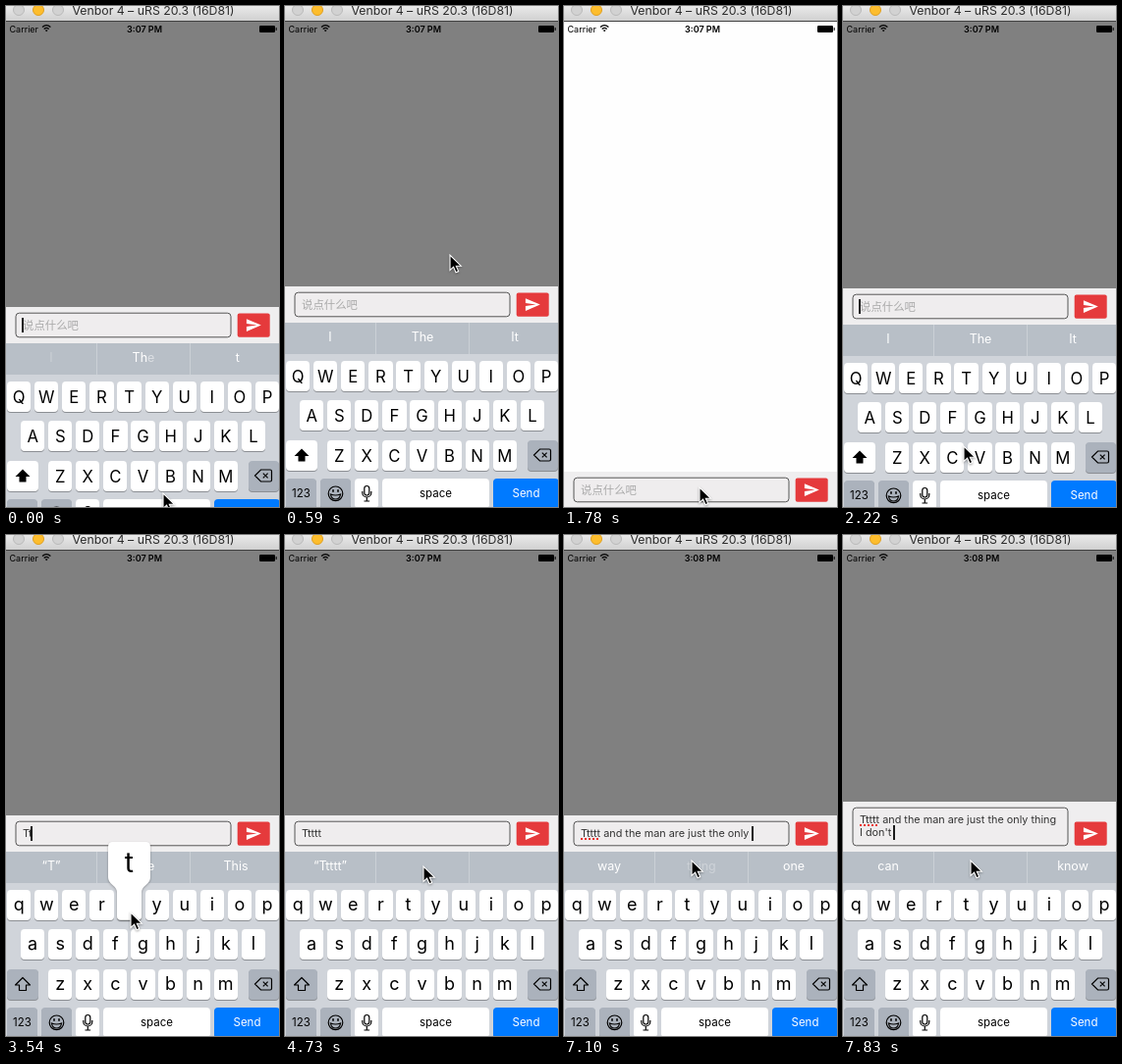
These frames come from a looping animation (278x511 px, 8 s). An HTML page:

```html
<!DOCTYPE html>
<html lang="en">
<head>
<meta charset="utf-8">
<title>Chat input</title>
<style>
html, body { margin: 0; width: 100%; height: 100%; overflow: hidden; }
#stage { position: relative; width: 278px; height: 511px; overflow: hidden; background: #808080;
  font-family: Inter, "Liberation Sans", sans-serif; color: #000; }
#stage.idle { background: #fefefe; }
#stage * { box-sizing: border-box; }
#stage div, #stage svg { position: absolute; }
#title { left: 0; top: 0; width: 278px; height: 16px; background: linear-gradient(#e9e9e9, #d0d0d0);
  border-bottom: 1px solid #404040; }
#title i { position: absolute; top: -2px; width: 12px; height: 12px; border-radius: 50%;
  background: #d2d2d2; border: 1px solid #bababa; }
#title .mid { background: #fdbd2d; border-color: #dfa023; }
#name { left: 61px; width: 178px; top: -4px; text-align: center; font-size: 12.3px; line-height: 17px;
  white-space: nowrap; color: #2c2c2c; }
.status { top: 18px; font-size: 9px; line-height: 12px; white-space: nowrap; }
#clock { left: 101px; width: 80px; text-align: center; font-weight: 600; }
#bar { left: 0; width: 278px; background: #efeeef; }
#bar svg { left: 0; top: 0; overflow: visible; }
#text { left: 17px; top: 11.5px; font-size: 10.85px; line-height: 13.5px; white-space: pre; color: #333; }
#hint { left: 17px; top: 10px; font: 11.4px/16px "Noto Sans CJK SC", "Noto Sans CJK", sans-serif;
  white-space: nowrap; color: #aaa; }
#text u { text-decoration: underline dotted #e8322c 2px; text-underline-offset: 2px; text-decoration-skip-ink: none; }
#caret { position: absolute; width: 2px; height: 15px; margin: -1px 0 0 -1px; background: #1c1c1c; }
#kb { left: 0; top: 323px; width: 278px; height: 190px; background: #d0d4da; }
#words { left: 0; top: 0; width: 278px; height: 32px; background: #b8bfc7; }
#words div { top: 0; height: 32px; text-align: center; color: #fff; font-size: 12.5px; line-height: 29px; }
#words div + div { border-left: 1px solid #cbd0d6; }
.key { height: 31px; border-radius: 4px; background: #fff; box-shadow: 0 1px 0 #8b8e93; text-align: center;
  font-size: 18px; line-height: 29px; }
.caps .letter { font-size: 16.7px; line-height: 33px; text-transform: uppercase; }
.key.dark { background: #abb2bc; }
.key.small { font-size: 11.5px; line-height: 31px; }
.key.blue { background: #007aff; color: #fff; }
.caps #shift { background: #fff; }
.caps #arrow { fill: #000; stroke: none; }
#kb svg { left: 0; top: 0; overflow: visible; }
#pop { filter: drop-shadow(0 1px 1px rgba(0,0,0,.3)); }
#cursor { left: -1px; top: -1px; overflow: visible; filter: drop-shadow(0 1px 1px rgba(0,0,0,.35)); }
</style>
</head>
<body>
<div id="stage">
  <div id="title"><i style="left:7px"></i><i class="mid" style="left:27px"></i><i style="left:47px"></i>
    <div id="name">Venbor 4 – uRS 20.3 (16D81)</div></div>
  <div class="status" style="left:3.5px">Carrier</div>
  <div class="status" id="clock"></div>
  <svg width="278" height="32" fill="none" stroke="#000">
    <path d="M37 21.5q4.2-3.6 8.4 0M38.7 23.4q2.5-2.1 5 0" stroke-width="1.3"/>
    <path d="M39.8 24.7q1.4-1 2.8 0l-1.4 1.6z" fill="#000" stroke="none"/>
    <rect x="258" y="20" width="16" height="7" rx="1.3" fill="#000" stroke="none"/>
    <path d="M275.2 22v3"/>
  </svg>
  <div id="bar">
    <svg width="278" height="51">
      <rect id="field" x="10" y="6.2" width="219" rx="3.5" fill="#efedee" stroke="#444" stroke-width=".9"/>
      <g id="send">
        <rect x="235.700" y="6.500" width="33" height="24.200" rx="2" fill="#e53a3c"/>
        <path transform="translate(243.500 10) scale(.71)" fill="#fff" d="M2 21L23 12 2 3V10L17 12 2 14z"/>
      </g>
    </svg>
    <div id="hint">说点什么吧</div>
    <div id="text"><span id="typed"></span><i id="caret"></i></div>
  </div>
  <div id="kb">
    <div id="words"><div style="left:0;width:92px"></div><div style="left:92px;width:95px"></div><div style="left:187px;width:93px"></div></div>
    <div id="keys"></div>
    <svg width="278" height="188" viewBox="0 323 278 188" fill="none" stroke="#000" stroke-width="1.2">
      <path id="arrow" d="M17 451.5l-7.5 7.5h4v5.5h7v-5.5h4z" stroke-linejoin="round"/>
      <path d="M259.5 452h9.5q1.5 0 1.5 1.5v9q0 1.5-1.5 1.5h-9.5l-6-6zM261.8 455.6l4.8 4.8m0-4.8l-4.8 4.8"/>
      <circle cx="51.5" cy="497.3" r="7.3"/>
      <path d="M46.5 498q.6 5 5 5t5-5q-5 2-10 0z"/>
      <path d="M49 493.2v2.6m5-2.6v2.6" stroke-width="1.6"/>
      <rect x="80.8" y="489.5" width="5" height="9.5" rx="2.5"/>
      <path d="M78.8 495v1.5a4.5 4.5 0 0 0 9 0v-1.5M83.3 501v4m-2.8 0h5.6"/>
      <g id="pop" stroke="none">
        <path fill="#fff" d="M109 313h33q5 0 5 5v31q0 4-4 7.5q-5 4-5 8v24q0 4-4 4h-17q-4 0-4-4v-24q0-4-5-8q-4-3.5-4-7.5v-31q0-5 5-5z"/>
        <text id="big" x="125.3" y="344" font-size="28" text-anchor="middle" fill="#000"></text>
      </g>
    </svg>
  </div>
  <svg id="cursor" width="16" height="22" viewBox="-1 -1 16 22">
    <path d="M0 0V15.5L3.6 12.2L6 17.800L8.700 16.6L6.3 11.2H11.3z" fill="#000" stroke="#fff" stroke-width="1.1"/>
  </svg>
</div>
<script>
const $ = id => document.getElementById(id);
const LOOP = 8000, TICK = 147.7;

function addKey(x, y, w, label, cls, id) {
  const k = document.createElement('div');
  k.className = 'key ' + cls;
  k.style.cssText = `left:${x}px;top:${y - 323}px;width:${w}px`;
  k.textContent = label;
  if (id) k.id = id;
  $('keys').append(k);
}
[['qwertyuiop', 1], ['asdfghjkl', 15], ['zxcvbnm', 43]].forEach(([row, x], r) =>
  [...row].forEach((c, i) => addKey(x + 28.1 * i, 361.5 + 40.5 * r, 24.3, c, 'letter', 'key-' + c)));
addKey(1, 442.5, 32, '', 'dark', 'shift');
addKey(247, 442.5, 31, '', 'dark');
addKey(1, 482, 31, '123', 'dark small');
addKey(36, 482, 31, '', 'dark');
addKey(71, 482, 24, '', '');
addKey(99, 482, 109, 'space', 'small');
addKey(212, 482, 67, 'Send', 'blue small');

// pointer: tick, x, y (held until the next entry)
const path = [[0, 160, 497], [1, 163, 440], [2, 166, 340], [3, 168, 270], [4, 168, 254],
  [7, 170, 344], [8, 166, 400], [9, 160, 450], [10, 150, 478], [11, 142, 488], [12, 138, 491],
  [15, 123, 449], [16, 124, 430], [17, 126, 405], [18, 127, 390], [19, 127, 385],
  [29, 133, 352], [30, 139, 342], [31, 141, 338], [34, 136, 334], [36, 130, 332]];
// typed letters: tick, text
const typing = [[0, ''], [23, 'T'], [24, 'Tt'], [26, 'Ttt'], [27, 'Tttt'], [28, 'Ttttt']];
// picked words: tick, word, next suggestions
const picks = [[33, '', 'I,and,to'], [35, 'and ', 'I,the,to'], [38, 'the ', 'first,man,the'],
  [40, 'man ', 'who,are,I'], [43, 'are ', 'who,just,I'], [45, 'just ', 'a,the,in'],
  [46, 'the ', 'same,only,best'], [48, 'only ', 'way,thing,one'], [50, 'thing ', 'is,I,that'],
  [51, '\nI ', 'can,don’t,have'], [53, 'don\'t ', 'can,,know']];

const last = (list, k) => list.filter(e => e[0] <= k).pop();
const within = (k, a, b) => k >= a && k <= b;
const dim = (s, o) => `<span style="opacity:${o}">${s}</span>`;

function suggestions(k, letters, pick) {
  if (k === 0) return [dim('I', .25), 'Th' + dim('e', .5), dim('I', 0) + 't'];
  if (k < 23) return ['I', 'The', 'It'];
  if (k < 25) return ['“T”', 'The', 'This'];
  if (!pick) return [`“${letters}”`, '', ''];
  const w = pick[2].split(',');
  if (pick[0] === k) w[1] = dim(w[1], .3);
  return w;
}

function draw(k) {
  const idle = within(k, 7, 14);
  const drop = idle ? 189 : { 0: 21, 1: 1, 15: 2 }[k] || 0;
  const letters = last(typing, k)[1], pick = last(picks, k);
  const tail = picks.filter(p => p[0] <= k).map(p => p[1]).join('');
  const extra = tail.includes('\n') ? 14 : 0;
  const pressed = [22, 24, 26, 27, 28].includes(k);

  $('stage').className = idle ? 'idle' : '';
  $('clock').textContent = k < 40 ? '3:07 PM' : '3:08 PM';
  $('bar').style.top = 286 - extra + drop + 'px';
  $('bar').style.height = 37 + extra + 'px';
  $('field').setAttribute('height', 24.6 + extra);
  $('send').setAttribute('transform', `translate(0 ${extra})`);
  $('hint').style.display = letters ? 'none' : '';
  $('typed').innerHTML = tail ? `<u>${letters}</u> ${tail}` : letters;
  const off = idle || within(k, 4, 6) || within(k, 19, 21) || within(k, 31, 33);
  $('caret').style.visibility = off ? 'hidden' : '';

  $('kb').style.top = 323 + drop + 'px';
  $('kb').className = k < 23 ? 'caps' : '';
  suggestions(k, letters, pick).forEach((w, i) => $('words').children[i].innerHTML = w);
  $('pop').style.display = pressed ? '' : 'none';
  $('big').textContent = k < 23 ? 'T' : 't';
  $('key-t').style.color = pressed ? 'transparent' : '';

  const [, x, y] = last(path, k);
  $('cursor').style.transform = `translate(${x}px,${y}px)`;
}

let shown = -1;
const start = performance.now();
function loop() {
  const t = (performance.now() - start) % LOOP;
  const k = Math.min(53, Math.floor((t + 8) / TICK));
  if (k !== shown) draw(shown = k);
  requestAnimationFrame(loop);
}
loop();
</script>
</body>
</html>
```
